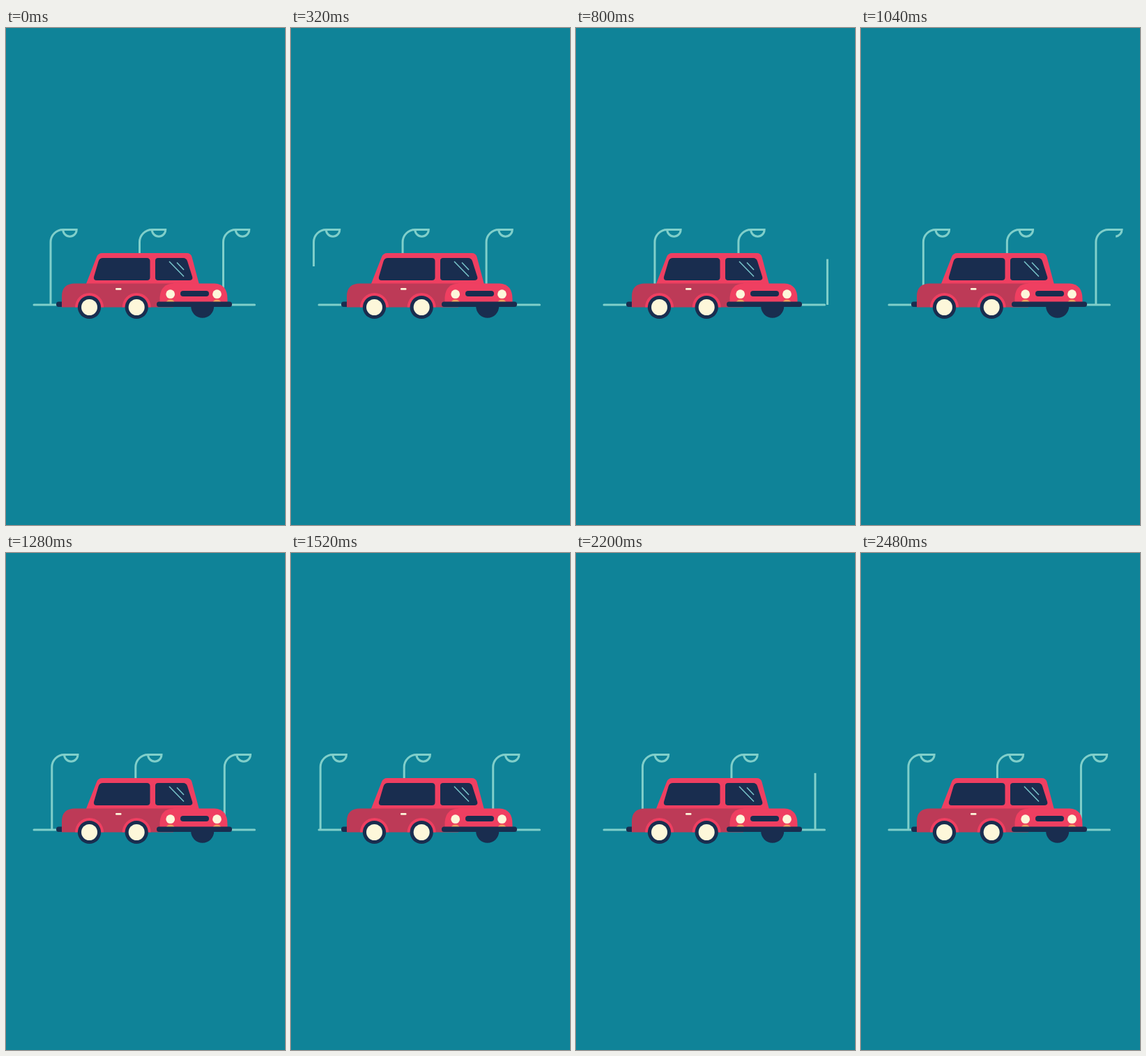
Animation, 400 px wide and 711 px high, one loop 2.52 s. Source, as an HTML page:

```html
<!DOCTYPE html>
<html lang="en">
<head>
<meta charset="utf-8">
<title>Car and street lamps</title>
<style>
  html, body { margin: 0; width: 100%; height: 100%; overflow: hidden; background: #0f8398; }
  svg { display: block; width: 100%; height: 100%; }
  .line { fill: none; stroke: #80cfca; stroke-width: 3; }
  .red { fill: #ef3f61; }
  .dark { fill: #bd3a57; }
  .navy { fill: #192d4f; }
  .cream { fill: #fdf7da; }
  .amber { fill: #f3a05c; }
</style>
</head>
<body>
<svg viewBox="0 0 400 711">
  <path class="line" d="M40 396H356.5" stroke-linecap="round"/>
  <g id="lamps"></g>

  <rect class="navy" x="72" y="391.5" width="30" height="7.5" rx="3.5"/>
  <circle class="navy" cx="281.7" cy="398.3" r="16.5"/>
  <path class="red" d="M114.500 367L130 327.500Q132 322 138 322H259Q265 322 266.500 327.500L277 367Z"/>
  <path class="navy" d="M139 329H202Q206.500 329 206.500 333.500V356.500Q206.500 361 202 361H130Q125 361 126 356L132.500 334Q134 329 139 329Z"/>
  <path class="navy" d="M218 329H254Q258.500 329 260 333.500L267 355.500Q268.500 361 263 361H218Q214 361 214 357V333Q214 329 218 329Z"/>
  <path d="M234 334L255 355.500M245 335.500L255 346" fill="none" stroke="#79c5cb" stroke-width="1.5"/>
  <path class="dark" d="M80 399.500V384Q80 365.500 99 365.500H240V399.500Z"/>
  <rect class="cream" x="157" y="372" width="8.500" height="2.700" rx="1.200"/>
  <g id="wheels"></g>
  <path class="red" d="M220.500 392V385Q222 365.500 241 365.500H299Q317.500 366.500 317.500 388V392Z"/>
  <rect class="navy" x="250" y="376" width="41" height="8" rx="4"/>
  <circle class="cream" cx="235.700" cy="380.700" r="6.400"/>
  <circle class="cream" cx="302.500" cy="380.700" r="6.400"/>
  <path class="amber" d="M230 392Q231 388.500 235.700 388.500T241.400 392ZM296.800 392Q298 388.500 302.500 388.500T308.200 392Z"/>
  <rect class="navy" x="216" y="391.500" width="108" height="7.500" rx="3.500"/>
</svg>
<script>
const NS = 'http://www.w3.org/2000/svg';
const LOOP = 2520, STEP = 40;
const SHIFT = 247.5;          // distance travelled per loop
const GROW = 14.3 / STEP;     // px of outline per ms
const ERASE = 13 / STEP;
const LAMP = 'M0 396V306.300A17.800 17.800 0 0 1 17.800 288.500H37.200A9.700 9.700 0 0 1 17.800 288.500';

function add(parent, tag, attrs) {
  const el = document.createElementNS(NS, tag);
  for (const key in attrs) el.setAttribute(key, attrs[key]);
  return document.getElementById(parent).appendChild(el);
}

for (const x of [119.5, 187.2]) {
  add('wheels', 'path', { class: 'red', d: `M${x - 20.5} 399.5a20.5 20.5 0 0 1 41 0Z` });
  add('wheels', 'circle', { class: 'navy', cx: x, cy: 399.5, r: 16.6 });
  add('wheels', 'circle', { class: 'cream', cx: x, cy: 399.5, r: 11.5 });
}

// Each lamp lives longer than one loop, so it appears at three ages.
const lamps = [
  { x: 439, grow: 617, erase: 4043 },
  { x: 559, grow: 1973, erase: 5191 }
].flatMap(lamp => [0, 1, 2].map(age => ({
  ...lamp, age, el: add('lamps', 'path', { class: 'line', d: LAMP })
})));
const length = lamps[0].el.getTotalLength();
const clamp = v => Math.max(0, Math.min(length, v));

function draw(time) {
  for (const { x, grow, erase, age, el } of lamps) {
    const t = time + age * LOOP;
    const from = clamp((t - erase) * ERASE);
    const to = clamp((t - grow) * GROW);
    el.style.display = to - from > 0.01 ? '' : 'none';
    el.setAttribute('transform', `translate(${x - SHIFT * t / LOOP} 0)`);
    el.setAttribute('stroke-dasharray', from > 0 || to < length ? `0 ${from} ${to - from} 999` : 'none');
  }
}

const start = performance.now();
function tick() {
  const t = (performance.now() - start) % LOOP;
  draw(Math.floor(t / STEP) * STEP);
  requestAnimationFrame(tick);
}
tick();
</script>
</body>
</html>
```
